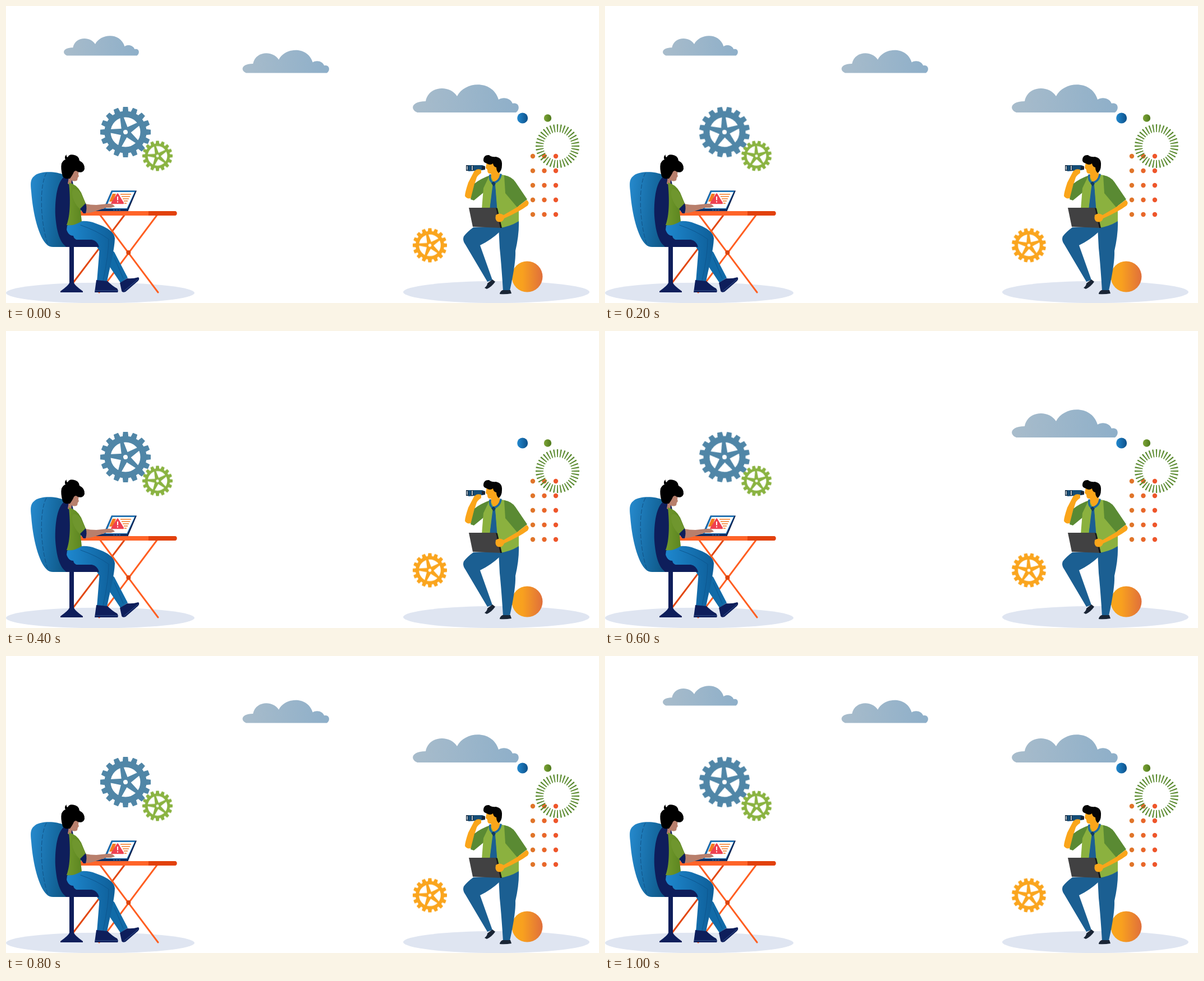
Write an HTML page without scripts that moves like this. It is 1057x530 px and loops after 1200 ms.

```html
<!DOCTYPE html>
<html lang="en">
<head>
<meta charset="utf-8">
<title>Remote work scene</title>
<style>
  html, body { margin: 0; width: 100%; height: 100%; overflow: hidden; background: #fff; }
  svg { display: block; width: 1057px; height: 530px; }
  .cloud { fill: url(#mist); animation: 1.2s step-end infinite; }
  .left { animation-name: left; }
  .middle { animation-name: middle; }
  .right { animation-name: right; }
  @keyframes left { 33.333% { visibility: hidden; } 83.333% { visibility: visible; } }
  @keyframes middle { 33.333% { visibility: hidden; } 66.667% { visibility: visible; } }
  @keyframes right { 33.333% { visibility: hidden; } 50% { visibility: visible; } }
  .gear { animation: turn .4s step-end infinite; }
  @keyframes turn { 0% { transform: rotate(0); } 50% { transform: rotate(11.25deg); } }
  .ground { fill: #dfe5f1; }
  .navy { fill: #0e1e5b; }
  .skin { fill: #b87f6c; }
  .gold { fill: #faa51a; }
  .denim { fill: #1b5f92; }
  .lime { fill: #8bb13f; }
  .moss { fill: #5a8a33; }
  .ink { fill: #1a2535; }
  .line { fill: none; stroke-linecap: round; }
</style>
</head>
<body>
<svg viewBox="0 0 1057 530" xmlns="http://www.w3.org/2000/svg">
  <defs>
    <linearGradient id="mist"><stop stop-color="#a8bccb"/><stop offset="1" stop-color="#8eafc9"/></linearGradient>
    <linearGradient id="sea"><stop stop-color="#2289cf"/><stop offset="1" stop-color="#0d5089"/></linearGradient>
    <linearGradient id="leaf"><stop stop-color="#7da436"/><stop offset="1" stop-color="#4f7a1d"/></linearGradient>
    <linearGradient id="shirt"><stop stop-color="#729a2c"/><stop offset="1" stop-color="#557f1d"/></linearGradient>
    <linearGradient id="sun"><stop stop-color="#faa61a"/><stop offset=".35" stop-color="#f8a01f"/><stop offset="1" stop-color="#e06f3b"/></linearGradient>
    <linearGradient id="chair" x1="0" y1=".4" x2="1" y2=".6"><stop stop-color="#2486c8"/><stop offset=".45" stop-color="#176da6"/><stop offset="1" stop-color="#0b4d78"/></linearGradient>
    <linearGradient id="jeans"><stop stop-color="#1e88cf"/><stop offset="1" stop-color="#0e5e98"/></linearGradient>

    <path id="cloud" d="M8 50C-5 45-3 30 23 30C28 2 66 0 79 21C93-6 142-9 153 27C162 21 175 25 178 34C190 31 192 45 184 50Z"/>

    <!-- A unit gear has 16 teeth and an outer radius of 45. -->
    <path id="tooth" d="M-5.500-34L-4.300-45H4.300L5.500-34Z"/>
    <g id="pair"><use href="#tooth"/><use href="#tooth" transform="rotate(22.5)"/></g>
    <g id="quarter"><use href="#pair"/><use href="#pair" transform="rotate(45)"/></g>
    <g id="crown">
      <use href="#quarter"/><use href="#quarter" transform="rotate(90)"/>
      <use href="#quarter" transform="rotate(180)"/><use href="#quarter" transform="rotate(270)"/>
    </g>
    <path id="spoke" d="M-6-5L-2.800-30H2.800L6-5Z"/>
    <g id="hub" transform="rotate(-14)">
      <use href="#spoke"/><use href="#spoke" transform="rotate(72)"/><use href="#spoke" transform="rotate(144)"/>
      <use href="#spoke" transform="rotate(216)"/><use href="#spoke" transform="rotate(288)"/>
      <circle r="9"/><circle r="4" fill="#fff"/>
    </g>
    <g id="dots">
      <circle cx="939" r="4.2" fill="#e0752a"/><circle cx="959.5" r="4.2" fill="#e8672a"/><circle cx="980" r="4.2" fill="#ee562b"/>
    </g>
  </defs>

  <g class="cloud left"><use href="#cloud" transform="translate(103 53) scale(.709)"/></g>
  <g class="cloud middle"><use href="#cloud" transform="translate(421.5 78.5) scale(.818)"/></g>
  <g class="cloud right"><use href="#cloud" transform="translate(725 140)"/></g>

  <ellipse class="ground" cx="168" cy="512" rx="168" ry="18.3"/>
  <ellipse class="ground" cx="874" cy="510.5" rx="166" ry="19.5"/>

  <g transform="translate(213 225)"><g class="gear" fill="#5086a7">
    <use href="#crown"/><circle r="32" fill="none" stroke="#5086a7" stroke-width="11"/><use href="#hub"/>
  </g></g>
  <g transform="translate(270 267.5) scale(.6)"><g class="gear" fill="#8ab341">
    <use href="#crown"/><circle r="33" fill="none" stroke="#8ab341" stroke-width="8"/><use href="#hub"/>
  </g></g>
  <g transform="translate(755.5 427) scale(.678)"><g class="gear" fill="#faa51e">
    <use href="#crown"/><circle r="33" fill="none" stroke="#faa51e" stroke-width="9"/><use href="#hub"/>
  </g></g>

  <g id="ornaments">
    <circle cx="920.7" cy="200" r="9.5" fill="url(#sea)"/>
    <circle cx="965.5" cy="200" r="6.7" fill="url(#leaf)"/>
    <use href="#dots" y="268"/><use href="#dots" y="294"/><use href="#dots" y="320"/><use href="#dots" y="346"/><use href="#dots" y="372"/>
    <circle cx="983" cy="250" r="32" fill="none" stroke="#5a8a2f" stroke-width="14" pathLength="360" stroke-dasharray="3.600 6.400" stroke-dashoffset="1.800"/>
    <circle cx="929" cy="483" r="27.5" fill="url(#sun)"/>
  </g>

  <g id="desk">
    <g class="line" stroke="#ff5f22" stroke-width="3">
      <path d="M212 372L118 496" stroke="#e2480f"/>
      <path d="M167 372L271 511M270 372L166 511"/>
    </g>
    <circle cx="218.3" cy="440" r="4" fill="#dc440e"/>
    <rect x="129" y="366" width="175.5" height="8" rx="4" fill="#ff6429"/>
    <path d="M254 366H300.500A4 4 0 0 1 300.500 374H254Z" fill="#e2410c"/>
  </g>

  <g id="laptop">
    <path d="M188 329.500H233L217.500 366H172Z" fill="#0d2150"/>
    <path d="M188 329.500H231L216 363H174Z" fill="#1b72b5"/>
    <path d="M190 332H229L215.500 361H178Z" fill="#fff"/>
    <path d="M190 335H196L191 349H184Z" fill="#f47a20"/>
    <path d="M204 336H223M206 340H221M208 344H219M210 348H217M211 352H215" stroke="#f47a20" stroke-width="1.5"/>
    <path d="M199 335.500L209 352H188.500Z" fill="#ef4050" stroke="#ef4050" stroke-width="2.5" stroke-linejoin="round"/>
    <path d="M199 340V346.500M199 348.500V350.500" stroke="#fff" stroke-width="2"/>
    <path d="M160 362H216L218 366H157Z" fill="#123064"/>
    <path d="M191 364H205" stroke="#4a83b5" stroke-dasharray="3 2"/>
  </g>

  <g id="worker">
    <path d="M104 302C88 294 62 295 52 302C44 308 43 314 45 331C48 371 58 412 73 426Q77 430 84 430H124L112 330Z" fill="url(#chair)"/>
    <path d="M72 298C60 319 60 379 74 424" class="line" stroke="#115286" stroke-dasharray="7 4"/>
    <path d="M113 428H121V494Q123 499 137 509V511H97V509Q111 499 113 494Z" class="navy"/>
    <path d="M108 302C91 309 87 344 88 374C90 402 96 424 109 430H166V418H121V335Q121 302 108 302Z" class="navy"/>
    <path d="M150 410L193 439L217 485L204 494L172 446Z" fill="#116ba8"/>
    <path d="M109 392C125 383 143 381 160 388C178 394 194 403 194 415C193 438 185 466 180 492H162L167 430C151 426 138 418 121 416Q111 410 107 407Z" fill="url(#jeans)"/>
    <path d="M133 391Q162 401 183 416Q183 445 173 490M193 449L209 486" class="line" stroke="#0d5790"/>
    <path d="M161 489L181 491Q190 500 198 504Q201 508 199 511H158Z" class="navy"/>
    <path d="M203 494L216 486Q226 487 236 484Q239 487 235 491L213 510Q207 512 206 508Z" class="navy"/>
    <path d="M159 508H199M211 508L235 488" class="line" stroke="#36558e"/>
    <path d="M113 300L118 291L130 292L129 301Q131 304 128 306L127 311Q122 314 117 311L116 320L110 317Z" class="skin"/>
    <path d="M101 304Q97 290 99 281Q102 275 106 274Q103 269 108 265Q107 269 110 270Q112 264 120 265.500Q130 267 131 276Q141 281 140 291Q137 299 128 296Q124 292 121 296Q119 301 114 308L111 308Q104 309 101 304Z"/>
    <path d="M112 315Q126 318 134 333L144 357L133 366L135 384Q121 393 108 391C115 374 115 343 112 315Z" fill="url(#shirt)"/>
    <path d="M141 353Q150 355 161 355L181 353Q190 352 194 358L187 360L178 360L157 367Q148 370 139 369L132 362Z" class="skin"/>
    <path d="M119 328C124 324 132 330 135 338L144 358L133 363C123 356 115 337 119 328Z" fill="#6f962e"/>
    <path d="M132 362L142 352Q145 360 142 370H138Z" class="navy"/>
    <path d="M107 393C108 403 112 410 120 410Q121 416 127 417H153Q163 419 166 430H107C99 419 97 405 97 391Z" class="navy"/>
  </g>

  <g id="lookout">
    <path d="M833 395Q822 403 816 411Q813 418 819 426L858 492L867 489L845 427Q864 418 881 402L887 393Z" class="denim"/>
    <path d="M878 393L914 383Q915 407 908 437Q909 458 898 508H886Q883 461 880 432Z" class="denim"/>
    <path d="M858 495L867 488L872 492Q866 501 857 505L853 503Q858 499 858 495Z" class="ink"/>
    <path d="M885 507H899L901 513Q890 515 880 514Q880 510 885 507Z" class="ink"/>
    <path d="M862 302H885L882 365H860Z" class="lime"/>
    <path d="M867 317H872L876 362H862Z" class="denim"/>
    <path d="M835 294L845 292L847 298Q841 302 839 306L834 322L831 342Q822 346 818 339Q818 333 824 315Z" class="gold"/>
    <path d="M863 302Q846 308 835 317L828 345L834 347L851 333Z" class="moss"/>
    <path d="M862 302L868 316L862 363H848L851 325Z" class="lime"/>
    <path d="M883 301Q896 302 899 311L914 349V384Q898 394 879 396L875 357L872 316Z" class="lime"/>
    <path d="M888 302Q901 304 908 314L929 345L911 359L890 334Z" class="moss"/>
    <path d="M865 292L877 290L881 301Q878 312 870 315L864 304Z" class="gold"/>
    <path d="M863 302Q861 311 868 316Q880 313 882 301" class="line" stroke="#1d689f" stroke-width="3.5"/>
    <path d="M865 316L869 313L873 317L869 322Z" fill="#103b63"/>
    <path d="M857 279L876 278L878 291Q873 300 862 299Q858 299 858 292L855 289Z" class="gold"/>
    <path d="M851 274Q852 265 861 266Q866 270 873 269Q885 271 884 284Q884 294 878 298Q874 294 874 288Q869 287 868 281Q863 285 857 281Q850 279 851 274Z" fill="#050505"/>
    <path d="M824 284H849L854 286V292L849 293L824 295Z" fill="#164d76"/>
    <path d="M848 286H854V292H848Z" class="ink"/>
    <path d="M822 284V294M831 284V294" stroke="#13283d" stroke-width="4"/>
    <path d="M822 285.500V292.500M831 285V293" stroke="#e4edf3" stroke-width="1.5"/>
    <path d="M836 294Q839 290 847 292L847 297L839 300Z" class="gold"/>
    <path d="M825 360H873L883 396L832 394Z" fill="#414142"/>
    <path d="M873 360L876 361L884 396H881Z" fill="#161718"/>
    <path d="M911 359L928 346Q934 350 930 356Q915 367 888 379Q885 387 877 385Q871 383 873 373Q880 368 887 373Z" class="gold"/>
  </g>
</svg>
</body>
</html>
```
